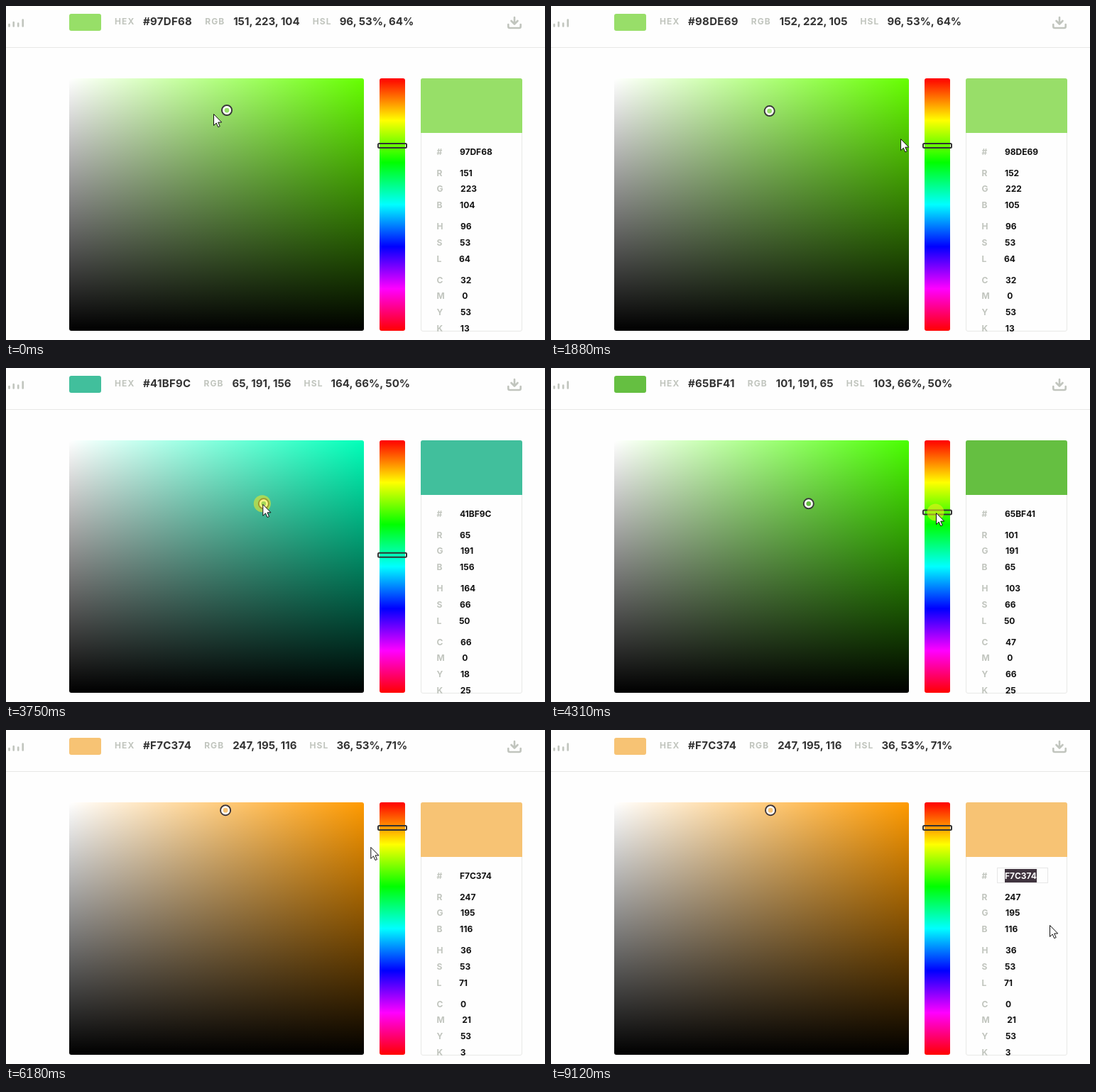
An HTML page that plays this animation: 759x471 px, repeating every 9.73 s.

```html
<!DOCTYPE html>
<html lang="en">
<head>
<meta charset="utf-8">
<title>Colour picker</title>
<style>
  html, body { margin: 0; width: 100%; height: 100%; overflow: hidden; background: #fefefe; }
  body { position: relative; font: 700 12px/19px Inter, Roboto, sans-serif; color: #111; }
  body > *, #swatch { position: absolute; box-sizing: border-box; }
  b { color: #c1c5be; }
  #rule { left: 0; right: 0; top: 58px; height: 1px; background: #e7e8e6; }
  #chip { left: 89px; top: 11px; width: 45px; height: 24px; border-radius: 3px; }
  #header { left: 153px; top: 11px; display: flex; align-items: center; height: 21px; white-space: pre; font-size: 15px; color: #333; }
  #header b { width: 40px; font-size: 12px; letter-spacing: 1.1px; }
  #header b:nth-of-type(3) { width: 38px; }
  #header span { margin-right: 18px; }
  #header span:first-of-type { letter-spacing: .3px; }
  #field { left: 89px; top: 102px; width: 415px; height: 356px; border-radius: 3px; }
  #hues { left: 526px; top: 102px; width: 36px; height: 356px; border-radius: 3px;
    background: linear-gradient(#f00, #ff0, #0f0, #0ff, #00f, #f0f, #f00); }
  #card { left: 584px; top: 102px; width: 143px; height: 357px; border: 1px solid #e8e9e7; border-radius: 3px; }
  #swatch { left: -1px; top: -1px; width: 143px; height: 77px; border-radius: 3px 3px 0 0; }
  #input { left: 628px; top: 194px; width: 72px; height: 22px; border: 1px solid #e6e6e6; }
  .row { left: 606.5px; white-space: pre; }
  .row span { display: inline-block; margin-left: 24.6px; }
  .selected { background: #40343f; color: #fff; }
  svg { left: 0; top: 0; }
  #beam { mix-blend-mode: difference; }
</style>
</head>
<body>
<div id="rule"></div>
<div id="chip"></div>
<div id="header"><b>HEX</b><span></span><b>RGB</b><span></span><b>HSL</b><span></span></div>
<div id="field"></div>
<div id="hues"></div>
<div id="card"><div id="swatch"></div></div>
<div id="input"></div>
<svg id="overlay" width="759" height="471" fill="none">
  <g stroke="#c1c5be" stroke-width="2.6" stroke-linecap="round" stroke-linejoin="round">
    <path d="M4.5 26v2.5M10.7 23v5.5M17.2 24.5v4M23.7 19.5v9"/>
    <path d="M716 16v9M711.5 21l4.5 4.5 4.5-4.5M707.3 26v3q0 2 2 2h13.4q2 0 2-2v-3"/>
  </g>
  <rect id="hueMark" x="524" width="40" height="6" rx="1.5" stroke="#333" stroke-width="2"/>
  <g id="mark">
    <circle id="dot" r="7" stroke="#3a343d" stroke-width="2"/>
    <circle id="ring" r="4.7" stroke="#fff" stroke-width="2.6"/>
  </g>
  <circle id="press" r="12" fill="#faeb1e" fill-opacity=".54"/>
  <path id="arrow" d="M.5 .5V16.5L4.2 13 6.7 18.7 9.2 17.6 6.7 12H11.7Z" fill="#fff" stroke="#111"/>
  <path id="beam" d="M-3-7.5h2.5l.5.5.5-.5h2.5M0-7V7M-3 7.5h2.5l.5-.5.5.5h2.5" stroke="#fff"/>
</svg>
<script>
const LOOP = 9730, DOUBLE_CLICK = 7170;
const FIELD = { x: 89, y: 102, w: 415, h: 356 };
const $ = id => document.getElementById(id);

// The pointer's gestures; the picked colour follows from its drags.
const start = { x: 293.5, y: 151.5 };
const gestures = [];
const go = (from, to, x, y, extra) => gestures.push({ from, to, x, y, ...extra });
const drag = (from, to, x, y, loop = 0) => go(from, to, x, y, { pressed: true, loop });

drag(70, 1120, 310.3, 143.9, 1);
drag(1190, 1480, 307.7, 148.07);
go(1480, 2050, 543.5, 197);
drag(2090, 2500, 543.5, 275.43);
drag(2570, 2650, 543.5, 263.7);
go(2980, 3300, 330, 160);
drag(3300, 3670, 362.8, 191.35);
go(3960, 4180, 543.5, 263.7);
drag(4180, 4450, 543.5, 137.9);
go(4670, 5020, 380, 155);
drag(5020, 5230, 318.2, 136.9);
drag(5300, 5640, 309.1, 113.2);
go(5700, 6600, 682, 206);
drag(6680, 6680, 682, 206);
go(7030, 7170, 667, 206);
drag(DOUBLE_CLICK, DOUBLE_CLICK, 667, 206);
go(7490, 7500, 670, 207);
go(8030, 8720, 703.5, 274.5);

const clamp = (n, lo, hi) => Math.min(hi, Math.max(lo, n));

// Eased travel; a loop adds one counter-clockwise turn of an ellipse.
function along(a, g, t) {
  const k = g.to > g.from ? clamp((t - g.from) / (g.to - g.from), 0, 1) : 1;
  const ease = g.loop ? k : k * k * (3 - 2 * k);
  const angle = -1.1, turned = angle - 2 * Math.PI * k;
  const loop = g.loop || 0;
  return {
    x: a.x + (g.x - a.x) * ease + loop * 65 * (Math.cos(turned) - Math.cos(angle)),
    y: a.y + (g.y - a.y) * ease + loop * 43 * (Math.sin(turned) - Math.sin(angle))
  };
}

function stateAt(t) {
  const state = { pointer: start, tone: { x: 311, y: 147.03 }, hueY: 197.03, pressed: false, settled: true };
  for (const g of gestures.filter(g => g.from <= t)) {
    const p = state.pointer = along(state.pointer, g, t);
    state.pressed = g.pressed;
    state.settled = !g.pressed || t > g.to + 65;
    if (!g.pressed) continue;
    if (p.x < FIELD.x + FIELD.w) state.tone = p;
    else if (p.x < 565) state.hueY = p.y;
  }
  return state;
}

function hsvToRgb(h, s, v) {
  return [5, 3, 1].map(n => {
    const k = (n + h / 60) % 6;
    return Math.round(255 * v * (1 - s * clamp(Math.min(k, 4 - k), 0, 1)));
  });
}

const values = ['#', 'RGB', 'HSL', 'CMYK'].flatMap((group, g) => [...group].map(label => ({ label, g })))
  .map(({ label, g }, i) => {
    const row = document.createElement('div');
    row.className = 'row';
    row.style.top = Math.floor(196 + 22.7 * i + 7.45 * g) + 'px';
    row.innerHTML = `<b>${label}</b><span></span>`;
    document.body.insertBefore(row, $('overlay'));
    return row.lastChild;
  });
const headerValues = document.querySelectorAll('#header span');

const show = (id, on) => { $(id).style.display = on ? '' : 'none'; };
const move = (id, x, y) => $(id).setAttribute('transform', `translate(${x} ${y})`);

function render(t) {
  const { pointer, tone, hueY, pressed, settled } = stateAt(t);
  const hue = (hueY - FIELD.y) / FIELD.h * 360;
  const rgb = hsvToRgb(hue, (tone.x - FIELD.x) / FIELD.w, 1 - (tone.y - FIELD.y) / FIELD.h);
  const max = Math.max(...rgb), min = Math.min(...rgb);
  const percent = n => Math.round(n * 100);
  const hex = rgb.map(n => n.toString(16).padStart(2, '0')).join('').toUpperCase();
  const hsl = [Math.round(hue), percent((max - min) / max), percent((max + min) / 510)];
  const cmyk = [...rgb.map(n => percent(1 - n / max)), percent(1 - max / 255)];

  headerValues[0].textContent = '#' + hex;
  headerValues[1].textContent = rgb.join(', ');
  headerValues[2].textContent = `${hsl[0]}, ${hsl[1]}%, ${hsl[2]}%`;
  [hex, ...rgb, ...hsl, ...cmyk].forEach((v, i) => { values[i].textContent = v; });
  values[0].className = t >= DOUBLE_CLICK ? 'selected' : '';

  const color = `rgb(${rgb})`;
  $('chip').style.background = $('swatch').style.background = color;
  $('field').style.background =
    `linear-gradient(to top, #000, transparent), linear-gradient(to right, #fff, hsl(${hue}, 100%, 50%))`;
  $('dot').setAttribute('fill', color);
  $('hueMark').setAttribute('y', hueY - 3);
  move('mark', tone.x, tone.y);
  show('ring', settled || pointer.x > FIELD.x + FIELD.w);

  const overInput = pointer.x > 628 && pointer.x < 700 && pointer.y > 194 && pointer.y < 216;
  show('input', overInput || t >= DOUBLE_CLICK);
  show('arrow', !overInput);
  show('beam', overInput);
  show('press', pressed);
  move('arrow', pointer.x - 1.5, pointer.y + .5);
  move('beam', pointer.x, pointer.y);
  move('press', pointer.x - (overInput ? 0 : 2), pointer.y);
}

function tick() {
  render(performance.now() % LOOP);
  requestAnimationFrame(tick);
}
tick();
</script>
</body>
</html>
```
